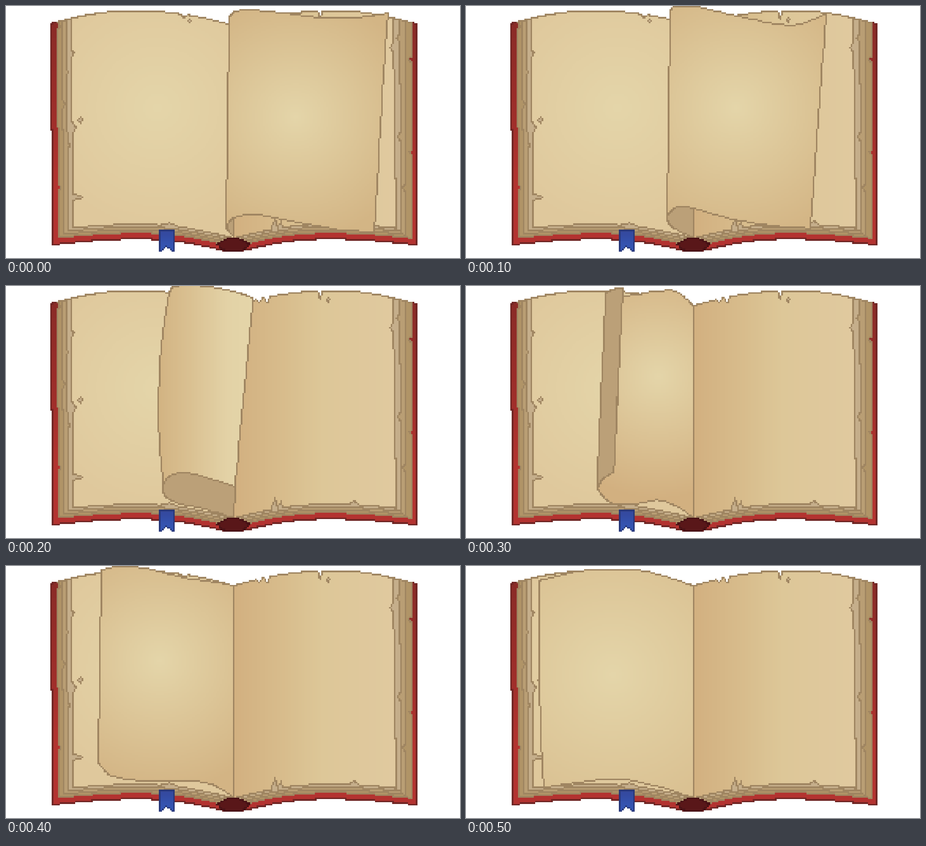
An HTML page with a canvas that plays this animation: 1004x558 px, repeating every 600 ms.

```html
<!DOCTYPE html>
<html lang="en">
<head>
<meta charset="utf-8">
<title>Old book</title>
<style>
  html, body { margin: 0; width: 100%; height: 100%; overflow: hidden; background: #fff; }
  canvas { display: block; width: 100vw; height: 100vh; image-rendering: pixelated; }
</style>
</head>
<body>
<canvas id="book" width="288" height="160"></canvas>
<script>
const W = 288, H = 160, UNIT = 1004 / W, STEP = 100, SPINE = 503;
const canvas = document.getElementById('book');
const ctx = canvas.getContext('2d');
const INK = '#9f8561', FOLD = '#bba078', EDGE = '#c5ae8b', CREAM = '#e4d5a9', TAN = '#d2b080';
let image;

const rgb = hex => [1, 3, 5].map(i => parseInt(hex.slice(i, i + 2), 16));
const cell = v => Math.floor(v / UNIT);

// Fills: functions of stage position.
function ramp(stops) {
  const list = stops.map(([at, hex]) => [at, rgb(hex)]);
  return v => {
    let i = 0;
    while (i < list.length - 2 && v > list[i + 1][0]) i++;
    const [a, from] = list[i], [b, to] = list[i + 1];
    const t = Math.min(1, Math.max(0, (v - a) / (b - a)));
    return from.map((c, k) => c + (to[k] - c) * t);
  };
}
const flat = hex => { const c = rgb(hex); return () => c; };
const across = (...stops) => { const f = ramp(stops); return x => f(x); };
const down = (...stops) => { const f = ramp(stops); return (x, y) => f(y); };
function glow(cx, cy, r, outer) {
  const f = ramp([[0, CREAM], [r, outer]]);
  return (x, y) => f(Math.hypot(x - cx, y - cy));
}

// Smooth line through key points given as x, y, x, y, ...
function curve(keys, steps = 16) {
  const n = keys.length / 2, out = [];
  const key = (i, k) => keys[2 * Math.min(n - 1, Math.max(0, i)) + k];
  for (let i = 0; i < n - 1; i++)
    for (let s = 0; s <= steps; s++) {
      const t = s / steps;
      out.push([0, 1].map(k => {
        const [a, b, c, d] = [-1, 0, 1, 2].map(o => key(i + o, k));
        return b + t * (c - a + t * (2 * a - 5 * b + 4 * c - d + t * (3 * (b - c) + d - a))) / 2;
      }));
    }
  return out;
}
const path = (...edges) => edges.flatMap(e => curve(e));

// Turns a curve into a function y(x).
function profile(keys) {
  const pts = curve(keys);
  return x => {
    const i = Math.max(1, pts.findIndex(p => p[0] >= x));
    const [x1, y1] = pts[i - 1], [x2, y2] = pts[i];
    return x2 === x1 ? y1 : y1 + (x - x1) * (y2 - y1) / (x2 - x1);
  };
}

// Top and bottom of the paper by distance from the spine.
const crown = profile([0, 44, 40, 33, 90, 22, 150, 14, 200, 12, 260, 12, 316, 19, 358, 28, 410, 41]);
const sag = profile([0, 514, 60, 500, 120, 489, 180, 484, 250, 484, 320, 488, 410, 497]);

// Torn places: each is [position, half width, depth].
const torn = (tears, v) =>
  tears.reduce((sum, [at, w, depth]) => sum + depth * Math.max(0, 1 - Math.abs(v - at) / w), 0);

function trace(from, to, point) {
  const n = Math.ceil(Math.abs(to - from) / 2);
  return Array.from({ length: n + 1 }, (_, i) => point(from + (to - from) * i / n));
}

function plot(x, y, c) {
  if (x < 0 || y < 0 || x >= W || y >= H) return;
  image.data.set([...c, 255], (y * W + x) * 4);
}

function line(x, y, x2, y2, c) {
  const dx = Math.abs(x2 - x), dy = -Math.abs(y2 - y);
  const sx = Math.sign(x2 - x), sy = Math.sign(y2 - y);
  let err = dx + dy;
  for (;;) {
    plot(x, y, c);
    if (x === x2 && y === y2) return;
    const e = 2 * err;
    if (e >= dy) { err += dy; x += sx; }
    if (e <= dx) { err += dx; y += sy; }
  }
}

function shape(points, fill, ink = INK) {
  const pts = points.map(p => p.map(cell));
  const sides = pts.map((p, i) => [...p, ...pts[(i + 1) % pts.length]]);
  for (let y = 0; y < H; y++) {
    const hits = sides
      .filter(([, y1, , y2]) => (y1 <= y) !== (y2 <= y))
      .map(([x1, y1, x2, y2]) => x1 + (y - y1) * (x2 - x1) / (y2 - y1))
      .sort((a, b) => a - b);
    for (let k = 0; k + 1 < hits.length; k += 2)
      for (let x = Math.ceil(hits[k]); x <= hits[k + 1]; x++)
        plot(x, y, fill((x + .5) * UNIT, (y + .5) * UNIT));
  }
  const c = rgb(ink);
  sides.forEach(s => line(...s, c));
}

// One half of the book block: x is the outer edge, lean its drift to the right
// towards the bottom, depth how far it shows below the paper.
function half({ x, lean = 0, depth = 0, fill, ink, top = [], side = [], bottom = [] }) {
  const dir = Math.sign(x - SPINE), dist = v => Math.abs(v - SPINE);
  const edge = y => x + lean * (y - 30) / 470;
  const low = v => Math.min(542, sag(dist(v)) + depth + torn(bottom, v));
  const foot = edge(500), inner = depth ? SPINE + dir * 335 : SPINE;
  shape([
    ...trace(x, inner, v => [v, crown(dist(v)) + torn(top, v)]),
    [SPINE, 500],
    ...trace(SPINE, foot, v => [v, low(v)]),
    ...trace(low(foot), crown(dist(x)), y => [edge(y) + torn(side, y), y])
  ], fill, ink);
}

function ring(x, y, rx, ry) {
  shape([[x - rx, y], [x, y - ry], [x + rx, y], [x, y + ry]], flat(EDGE));
}

function block() {
  const red = down([35, '#892b27'], [250, '#9f2e2a'], [400, '#b33330'], [530, '#b33330']);
  half({ x: 98.5, lean: 5, depth: 32, fill: red, ink: '#702624' });
  half({ x: 908, depth: 32, fill: red, ink: '#702624' });

  const tones = ['#b09467', '#b99e74', EDGE];
  const leftTears = [
    [[45, 8, 9], [402, 7, 6]],
    [[218, 10, 6]],
    [[146, 5, 4], [308, 14, 4]]
  ];
  const rightTears = [
    [[118, 6, -6], [324, 4, -6]],
    [[402, 8, -8]],
    [[72, 10, -7], [290, 10, -6]]
  ];
  tones.forEach((tone, i) => {
    const depth = 18 - 6 * i, fill = flat(tone);
    half({ x: 112.5 + 10.4 * i, lean: 5, depth, fill, side: leftTears[i] });
    half({ x: 896.5 - 13 * i, lean: i > 1 ? 3.4 : 0, depth, fill, side: rightTears[i] });
  });
}

function pages() {
  half({
    x: 143.8, lean: 5, fill: glow(335, 225, 270, '#dfc89c'),
    top: [[393, 9, 7]],
    side: [[105, 8, 6], [270, 14, 9], [423, 7, 24]],
    bottom: [[362, 20, -6]]
  });
  ring(164, 252, 6, 7);
  ring(405, 33, 3, 4);
  half({
    x: 856, lean: 6.8,
    fill: across([505, TAN], [620, '#d8bd8d'], [700, '#ddc798'], [860, '#e0c99f']),
    top: [[560, 7, 8], [578, 6, 15], [695, 5, 19]],
    side: [[92, 13, -7]],
    bottom: [[594, 6, -28], [607, 6, -14], [770, 13, -9]]
  });
  ring(713, 31, 4, 6);
}

function binding() {
  shape(path([467, 527, 503, 513, 540, 527], [540, 527, 520, 541, 485, 541, 467, 527]),
    flat('#591719'), '#481115');
  shape([[339, 497], [372, 497], [372, 542], [367, 541], [355, 531], [344, 541], [339, 542]],
    down([497, '#34479b'], [540, '#3558b8']), '#29387a');
}

const gutter = [SPINE, 44, SPINE, 513];

// The turning leaf, from lifting on the right to settling on the left.
const poses = [
  () => {
    const curl = [505, 468, 495, 476, 487, 492];
    shape(path(curl, [487, 492, 505, 513]), flat(FOLD));
    shape(path([493, 38, 497, 20, 525, 9, 600, 14, 690, 25, 780, 25, 845, 16],
      [845, 16, 835, 150, 815, 499],
      [815, 499, 740, 496, 640, 478, 550, 462, 505, 468], curl,
      [486.5, 492, 493.3, 38]), glow(640, 245, 275, '#d3b585'));
  },
  () => {
    const curl = [505, 448, 468, 444, 446, 463, 444.6, 475];
    shape(path([451, 25, 455, 5, 470, 1, 510, 2, 590, 20, 690, 40, 740, 40, 797, 17],
      [797, 17, 779, 250, 762, 492],
      [762, 492, 690, 488, 590, 472, 505, 448], curl,
      [444.6, 475, 451.3, 25]), glow(597, 225, 290, '#d4b686'));
    shape(path(curl, [445, 475, 460, 492, 505, 513]), flat(FOLD));
  },
  () => {
    const curl = [507, 444, 430, 420, 390, 413, 360, 422, 348, 440];
    shape(path([360, 18, 375, 1, 440, 1, 510, 14, 547, 27], [547, 27, 530, 200, 507, 444], curl,
      [348, 440, 337, 300, 343, 140, 360, 18]),
      across([337, '#d2b382'], [400, '#d9bf90'], [490, '#e3d2a6'], [545, CREAM]));
    shape(path(curl, [348, 440, 352, 465, 385, 482, 435, 492, 505, 514]), flat(FOLD));
  },
  () => {
    const bend = [291, 450, 302, 428, 327, 412], crease = [327, 412, 341, 125, 348, 5];
    shape(path(bend, crease, [348, 5, 325, 8, 309, 18], [309, 18, 295, 315, 291, 450]), flat(FOLD));
    shape(path([346, 22, 380, 19, 420, 12, 465, 13, 503, 44], gutter,
      [503, 513, 470, 490, 425, 474, 372, 483, 320, 480, 291, 450], bend,
      [327, 412, 341, 125, 346, 22]), glow(425, 200, 270, TAN));
  },
  () => shape(path([211, 10, 250, 1, 310, 6, 400, 27, 475, 38, 503, 44], gutter,
    [503, 513, 475, 493, 430, 478, 330, 477, 240, 467, 205, 437],
    [203.7, 437, 211, 10]), glow(340, 210, 290, '#d3b484')),
  () => shape(path([163, 32, 185, 27, 270, 9, 375, 9, 440, 23, 503, 44], gutter,
    [503, 513, 430, 490, 355, 473, 295, 473, 172, 490],
    [172, 490, 166, 380, 162, 200, 163, 32]), glow(325, 240, 330, '#d9bf90'))
];

const frames = poses.map(turn => {
  image = ctx.createImageData(W, H);
  image.data.fill(255);
  [block, pages, turn, binding].forEach(draw => draw());
  return image;
});

const start = performance.now();
let shown = -1;
function tick() {
  const pose = Math.floor((performance.now() - start) / STEP) % frames.length;
  if (pose !== shown) ctx.putImageData(frames[shown = pose], 0, 0);
  requestAnimationFrame(tick);
}
tick();
</script>
</body>
</html>
```
